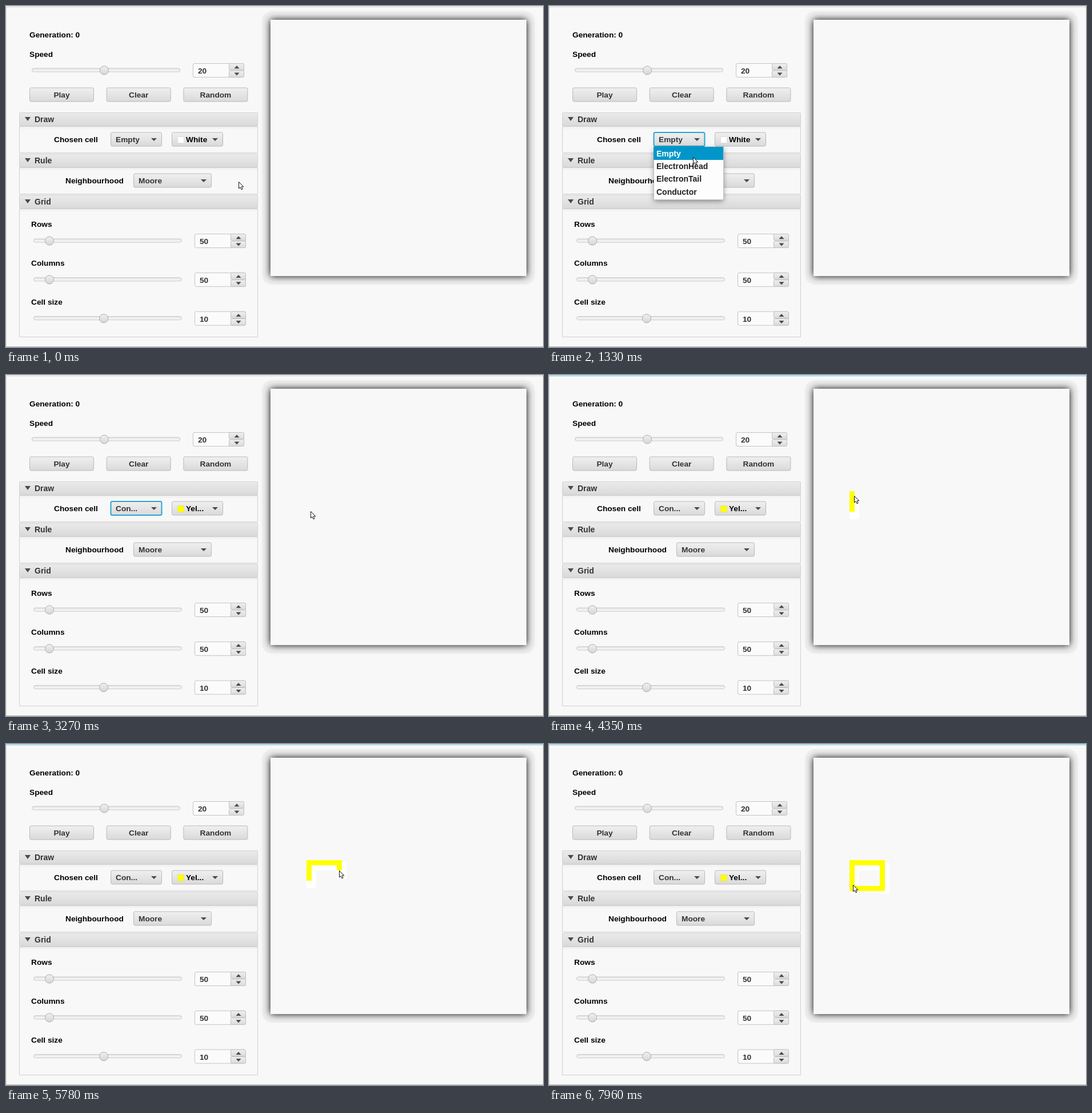
Recreate the animation shown at these times as an HTML page with a canvas. Size 940 by 596 pixels, loop 8 s.

```html
<!DOCTYPE html>
<html lang="en">
<head>
<meta charset="utf-8">
<title>Cellular automaton editor</title>
<style>
html, body { margin: 0; width: 100%; height: 100%; overflow: hidden; background: #f8f8f8; }
canvas { display: block; }
</style>
</head>
<body>
<canvas id="stage" width="940" height="596"></canvas>
<script>
const ctx = document.getElementById('stage').getContext('2d');
const LOOP = 8000, PAPER = '#f8f8f8', INK = '#333';
const MENU_OPEN = 980, SELECTED = 2470, MENU_CLOSED = 2650, PAINT = 3480;
const BOARD = { x: 463, y: 24, size: 448, cell: 448 / 50 };

// Pointer moves: start time, end time, destination
const moves = [
  [80, 540, 250, 232],     // to the cell type box
  [1140, 1330, 252, 264],  // down the menu
  [1330, 1570, 248, 287],
  [2050, 2210, 242, 318],
  [2790, 3270, 533, 238],  // to the board
  [3660, 4450, 534, 207],  // around the loop
  [4480, 5320, 581, 207],
  [5410, 6550, 587, 250],
  [6550, 7600, 530, 250],
  [7830, 7960, 532, 246]
];

function pointerAt(t) {
  let x = 407, y = 307;
  for (const [start, end, toX, toY] of moves) {
    const p = Math.min(1, Math.max(0, (t - start) / (end - start)));
    x += (toX - x) * p;
    y += (toY - y) * p;
  }
  return [x, y];
}

function fill(color, x, y, w, h) {
  ctx.fillStyle = color;
  ctx.fillRect(x, y, w, h);
}

function text(s, x, y, color = '#000', align = 'left', size = 13.7) {
  ctx.font = `bold ${size}px "Liberation Sans", Arial, sans-serif`;
  ctx.textAlign = align;
  ctx.fillStyle = color;
  ctx.fillText(s, x, y);
}

function shade(y, h, top, bottom) {
  const g = ctx.createLinearGradient(0, y, 0, y + h);
  g.addColorStop(0, top);
  g.addColorStop(1, bottom);
  return g;
}

function box(x, y, w, h, r, paint, border, line = 1) {
  ctx.beginPath();
  ctx.roundRect(x + .5, y + .5, w - 1, h - 1, r);
  ctx.fillStyle = paint;
  ctx.fill();
  ctx.strokeStyle = border;
  ctx.lineWidth = line;
  ctx.stroke();
}

function poly(points, color) {
  ctx.beginPath();
  points.forEach(([x, y]) => ctx.lineTo(x, y));
  ctx.closePath();
  ctx.fillStyle = color;
  ctx.fill();
}

// small triangle; a negative height points up
function arrow(x, y, half = 5, h = 5) {
  poly([[x - half, y - h / 2], [x + half, y - h / 2], [x, y + h / 2]], '#4a4a4a');
}

function raised(x, y, w, focused) {
  box(x, y, w, 25, 2.5, shade(y, 25, '#f0f0f0', '#d9d9d9'), focused ? '#2aa5d0' : '#b9b9b9', focused ? 2 : 1);
}

function combo(label, x, y, w, focused) {
  raised(x, y, w, focused);
  text(label, x + 9, y + 17.5, INK);
  arrow(x + w - 14, y + 13);
}

function slider(x, y, thumb, value) {
  box(x, y - 3.5, 260, 7, 3.5, shade(y - 3.5, 7, '#e4e4e4', '#fbfbfb'), '#c6c6c6');
  box(thumb - 8, y - 7.5, 16, 16, 8, shade(y - 8, 16, '#f2f2f2', '#d6d6d6'), '#acacac');

  const left = x + 282, top = y - 12;
  box(left, top, 90, 25, 2.5, '#fbfbfb', '#c4c4c4');
  for (const half of [0, 12.5])
    box(left + 63, top + half, 27, 12.5, 2, shade(top + half, 12.5, '#f0f0f0', '#dadada'), '#c0c0c0');
  arrow(left + 77, y - 5.2, 4.5, -5);
  arrow(left + 77, y + 7, 4.5, 5);
  text(value, left + 9, y + 6, INK);
}

function section(title, y, h) {
  box(23, y + 24, 418, h - 24, 0, PAPER, '#d0d0d0');
  fill(shade(y + 25, 5, '#efefef', PAPER), 24, y + 25, 416, 5);
  box(23, y, 418, 24, 1, shade(y, 24, '#ebebeb', '#d9d9d9'), '#d2d2d2');
  arrow(38, y + 11.5, 5, 7);
  text(title, 50, y + 16.5, INK, 'left', 14);
}

function board(t) {
  const { x: bx, y: by, size, cell } = BOARD;
  ctx.beginPath();
  ctx.roundRect(bx - 15, by - 15, size + 30, size + 30, 18);
  ctx.fillStyle = '#eeeeee';
  ctx.fill();
  ctx.save();
  ctx.shadowColor = '#000';
  ctx.shadowBlur = 12;
  fill(PAPER, bx, by, size, size);
  ctx.restore();

  // every cell the pressed pointer has crossed, with its pale trail
  const painted = new Map();
  for (let s = PAINT; s <= t; s += 10) {
    const [x, y] = pointerAt(s);
    const c = Math.floor((x - bx) / cell), r = Math.floor((y - by) / cell);
    painted.set(c + ',' + r, [c, r]);
    if (r < 25) fill('#fff', Math.round(bx + c * cell), Math.round(y), 17, 14);
  }
  for (const [c, r] of painted.values()) {
    const x = Math.round(bx + c * cell), y = Math.round(by + r * cell);
    fill('#ffff00', x, y, Math.round(bx + (c + 1) * cell) - x, Math.round(by + (r + 1) * cell) - y);
  }
}

function menu(pointerY) {
  ctx.save();
  ctx.shadowColor = 'rgba(0,0,0,.45)';
  ctx.shadowBlur = 9;
  ctx.shadowOffsetY = 3;
  fill('#fff', 184, 247, 121, 91);
  ctx.restore();
  box(183, 246, 123, 93, 0, '#fdfdfd', '#c4c4c4');
  const row = 22.4, hover = Math.max(0, Math.floor((pointerY - 246) / row));
  ['Empty', 'ElectronHead', 'ElectronTail', 'Conductor'].forEach((name, i) => {
    if (i === hover) fill('#0096c9', 183, Math.floor(246 + i * row), 122, 23);
    text(name, 188, 262.5 + i * row, i === hover ? '#fff' : '#222', 'left', 14);
  });
}

function pointer(x, y) {
  ctx.save();
  ctx.translate(Math.round(x) + .5, Math.round(y) + .5);
  poly([[0, 0], [0, 11.5], [2.6, 9.2], [4.6, 13.4], [6.6, 12.5], [4.7, 8.4], [8.4, 8.4]], '#fff');
  ctx.strokeStyle = '#111';
  ctx.lineWidth = 1;
  ctx.stroke();
  ctx.restore();
}

function draw(t) {
  const [px, py] = pointerAt(t), chosen = t >= SELECTED;

  fill(PAPER, 0, 0, 940, 596);
  fill(t >= PAINT ? '#62bbdc' : '#cfcfcf', 0, 1, 940, 1);
  fill('#b4b4b4', 0, 595, 940, 1);
  fill('#dedede', 0, 2, 1, 593);

  text('Generation: 0', 41, 55);
  text('Speed', 41, 89);
  slider(45, 112, 172, '20');
  ['Play', 'Clear', 'Random'].forEach((label, i) => {
    const x = 41 + i * 134.7;
    raised(x, 142.5, 113, label === 'Clear' && t >= 760 && t < MENU_OPEN);
    text(label, x + 56.5, 160, INK, 'center');
  });

  section('Draw', 186, 71);
  text('Chosen cell', 84, 238);
  combo(chosen ? 'Con...' : 'Empty', 183, 220.5, 90, t >= MENU_OPEN && t < PAINT);
  combo('', 290, 220.5, 90);
  box(300, 228, 12, 12, 0, chosen ? '#ffff00' : '#fff', chosen ? '#e5e08a' : '#dedede');
  text(chosen ? 'Yel...' : 'White', 315, 238);

  section('Rule', 258, 71);
  text('Neighbourhood', 104, 310);
  combo('Moore', 223, 292.5, 137);

  section('Grid', 330, 249);
  ['Rows', 'Columns', 'Cell size'].forEach((label, i) => {
    const y = 410 + i * 67.8, isSize = i === 2;
    text(label, 44, y - 24);
    slider(48, y, isSize ? 171 : 76, isSize ? '10' : '50');
  });

  board(t);
  if (t >= MENU_OPEN && t < MENU_CLOSED) menu(py);
  pointer(px, py);
}

function tick() {
  draw(performance.now() % LOOP);
  requestAnimationFrame(tick);
}
tick();
</script>
</body>
</html>
```
